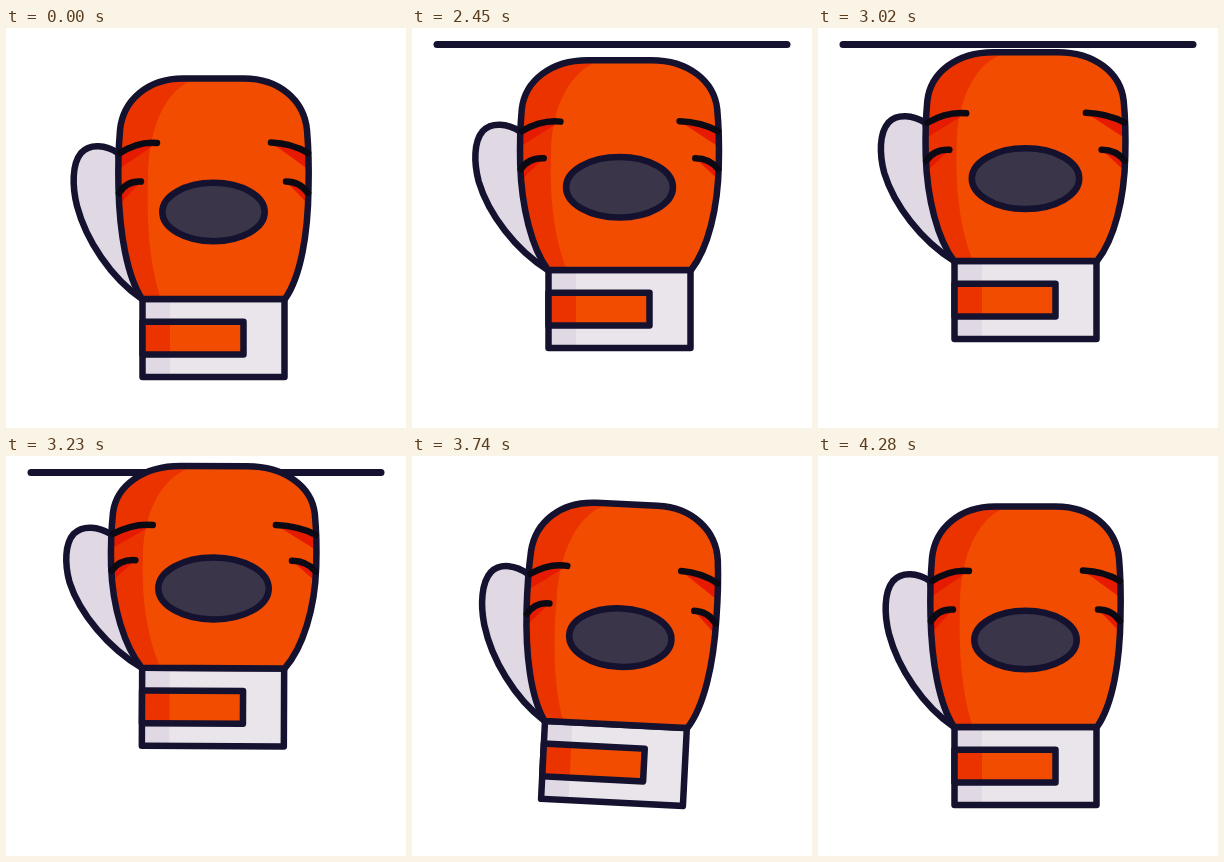
Animation of 400x400 px, one loop 4.31 s. Source, as an HTML page with a canvas:

```html
<!DOCTYPE html>
<html lang="en">
<head>
<meta charset="utf-8">
<title>Boxing glove</title>
<style>
html, body { margin: 0; width: 100%; height: 100%; overflow: hidden; background: #fff; }
canvas { display: block; width: 400px; height: 400px; }
</style>
</head>
<body>
<canvas width="400" height="400"></canvas>
<script>
const ctx = document.querySelector('canvas').getContext('2d');
const LOOP = 4310, HOLD = 2000, STEP = 30;
const NAVY = '#14122f', INK = '#0b0a14', ORANGE = '#f24c00', RED = '#eb3300', DEEP = '#e61a00';
const CUFF = '#eae5eb', CUFF_SHADE = '#e0d9e4', THUMB = '#e0d9e4', PATCH = '#3b354a';
const WRIST = 271, MID = 207.5;

// Keyframes: [step, value], eased between neighbours
const lift = [[0, 0], [9, 42], [19.7, -78], [27.5, 42], [38.1, -78], [49, 31], [60, -6], [75, 0]];
const squash = [[12.7, 0], [19.7, 1], [25, 0], [31.8, 0], [38.1, 1], [43.5, 0]];
const tilt = [[40, 0], [53, 15.6], [61, -3], [74, 0]];
const bar = [[0, 0], [9, 175], [46.4, 175], [56.4, 0]];

const bodyShape = 'M136 271 C121 248 113.5 205 112.5 160 C112 140 112.5 120 114 102 C117 72 142 50.5 177 50.5 ' +
  'L238 50.5 C273 50.5 298 72 301 102 C302.5 120 303 140 302.5 160 C302 205 295 248 279 271 Z';
const bodyShade = 'M100 271 L100 40 L190 50.5 C160 60 142 100 142 150 C140 205 146 245 155 271 Z';
const thumbShape = 'M112 125 C100 117 84 115 75 125 C66 136 66 158 71 178 C80 212 105 250 136 271 Z';
const folds = [
  ['M151 115 C138 113.5 125 118 114 125', ' L113 141 L151 115'],
  ['M135 153.5 C126 153 118 157 113 165', ' L114 176 L135 153.5'],
  ['M265 114.5 C280 115 292 119 302 125', ' L303 142 L265 114.5'],
  ['M280 153.5 C290 153.5 297 158 302 165', ' L302 176 L280 153.5']
];

const clamp = (v, lo, hi) => Math.min(hi, Math.max(lo, v));

function track(keys, n) {
  if (n <= keys[0][0]) return keys[0][1];
  for (let i = 1; i < keys.length; i++) {
    const [a, from] = keys[i - 1], [b, to] = keys[i];
    if (n < b) {
      const p = (n - a) / (b - a);
      return from + (to - from) * p * p * (3 - 2 * p);
    }
  }
  return keys[keys.length - 1][1];
}

// Flattens towards the wrist and bulges sideways above it
function press(x, y, q) {
  const bulge = 17 * q * clamp((WRIST - y) / 70, 0, 1);
  return [x + bulge * clamp((x - MID) / 95, -1, 1), WRIST - (WRIST - y) * (1 - 0.19 * q)];
}

function pressed(shape, q) {
  return new Path2D(shape.replace(/([\d.]+) ([\d.]+)/g, (_, x, y) => press(+x, +y, q).join(' ')));
}

function fill(path, color) {
  ctx.fillStyle = color;
  ctx.fill(path);
}

function stroke(path, color = NAVY) {
  ctx.strokeStyle = color;
  ctx.stroke(path);
}

function box(x, y, w, h, color, shade) {
  const path = new Path2D();
  path.rect(x, y, w, h);
  fill(path, color);
  ctx.fillStyle = shade;
  ctx.fillRect(x, y, 164 - x, h);
  stroke(path);
}

function drawGlove(q) {
  const thumb = pressed(thumbShape, q), body = pressed(bodyShape, q);
  fill(thumb, THUMB);
  stroke(thumb);
  box(136.5, 271, 142, 78, CUFF, CUFF_SHADE);
  box(136.5, 293.7, 101, 32.8, ORANGE, RED);

  fill(body, ORANGE);
  ctx.save();
  ctx.clip(body);
  fill(pressed(bodyShade, q), RED);
  for (const [line, shadow] of folds) fill(pressed(line + shadow, q), DEEP);
  ctx.restore();
  stroke(body);
  for (const [line] of folds) stroke(pressed(line, q), INK);

  const patch = new Path2D();
  patch.ellipse(...press(MID, 184, q), 51.2 + 9 * q, 29.2 + 4 * q, 0, 0, 7);
  fill(patch, PATCH);
  stroke(patch);
}

function draw(now) {
  const n = Math.max(0, Math.floor((now % LOOP - HOLD) / STEP));
  ctx.clearRect(0, 0, 400, 400);
  ctx.lineCap = ctx.lineJoin = 'round';

  const half = track(bar, n);
  if (half > 0) {
    ctx.lineWidth = 7;
    stroke(new Path2D(`M${200 - half} 16.4 H${200 + half}`));
  }

  ctx.save();
  ctx.lineWidth = 6.5;
  ctx.translate(200, 200 + track(lift, n));
  ctx.rotate(track(tilt, n) * Math.PI / 180);
  ctx.translate(-200, -200);
  drawGlove(track(squash, n));
  ctx.restore();
}

const start = performance.now();
function tick() {
  draw(performance.now() - start);
  requestAnimationFrame(tick);
}
tick();
</script>
</body>
</html>
```
